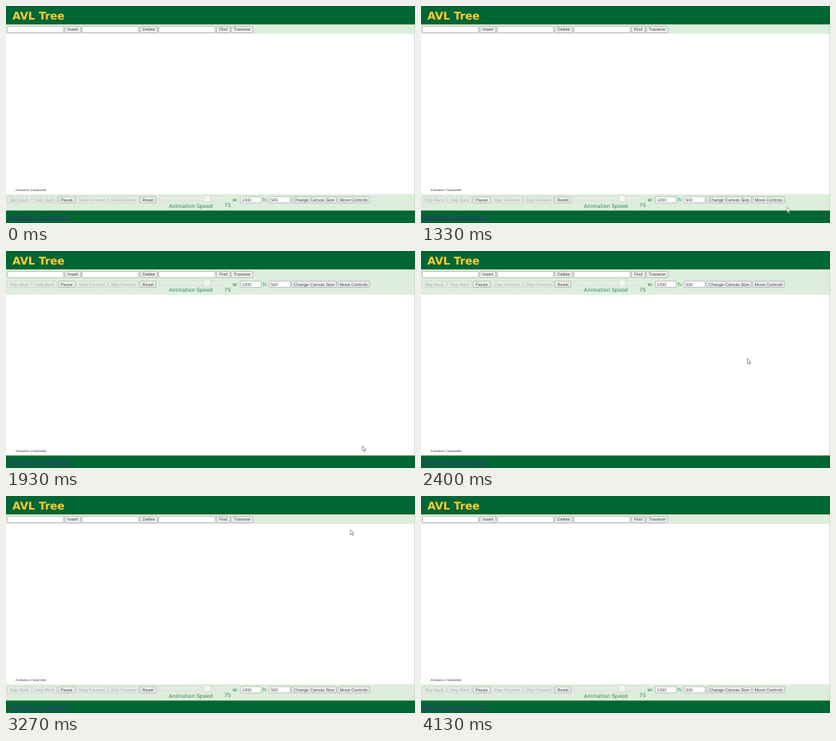
These frames come from a looping animation (512 by 272 pixels, 4.67 s). An HTML page:

```html
<!DOCTYPE html>
<html lang="en">
<head>
<meta charset="utf-8">
<title>AVL Tree</title>
<style>
  html, body { margin: 0; width: 100%; height: 100%; overflow: hidden; background: #fff; }
  svg { display: block; width: 100vw; height: 100vh; }
  text { text-rendering: geometricPrecision; }
  .ui { font: 5.45px "Liberation Sans", Arial, sans-serif; fill: #444; }
  .label { font: 6.43px "DejaVu Sans", Verdana, sans-serif; fill: #33805a; }
  .title { font: bold 13.4px "DejaVu Sans", Verdana, sans-serif; fill: #fc3; }
  .status { font: 4px "Liberation Sans", Arial, sans-serif; fill: #444; }
  .off { fill: #a6aca6; }
  .link { fill: #3a3286; text-decoration: underline; }
</style>
</head>
<body>
<svg id="stage" viewBox="0 0 512 272" preserveAspectRatio="none"></svg>
<script>
const LOOP = 4670, STEP = 200 / 3;
const GREEN = '#063', PALE = '#ded', EDGE = '#cc9';
const TOP_FROM = 29, TOP_TO = 49; // steps with the controls docked at the top
const GAP = 1.8;

const easeOut = u => 1 - (1 - u) ** 2;
const easeInOut = u => u * u * (3 - 2 * u);

// Pointer strokes: each runs from a to b, pulled towards c
const strokes = [
  { from: 0, to: 3, a: [520, 270], c: [500, 268], b: [480, 282], ease: u => u },
  { from: 13, to: 28, a: [488, 273], c: [467, 258], b: [446, 244], ease: easeOut },
  { from: 32, to: 40, a: [446, 244], c: [392, 118], b: [404, 59], ease: easeInOut },
  { from: 40, to: 47, a: [404, 59], c: [478, 28], b: [431, 42], ease: easeInOut },
  { from: 49, to: 62, a: [431, 42], c: [170, 122], b: [50, 282], ease: easeInOut }
];

const stage = document.getElementById('stage');

function add(parent, tag, attrs, content) {
  const node = document.createElementNS('http://www.w3.org/2000/svg', tag);
  for (const key in attrs) node.setAttribute(key, attrs[key]);
  if (content) node.textContent = content;
  parent.append(node);
  return node;
}

const rect = (parent, x, y, width, height, fill, more) =>
  add(parent, 'rect', { x, y, width, height, fill, ...more });

const text = (parent, x, y, cls, content, more) =>
  add(parent, 'text', { x, y, class: cls, ...more }, content);

function box(parent, x, y, width, fill, stroke) {
  rect(parent, x, y, width, 7.8, fill, { rx: .7, stroke, 'stroke-width': .6 });
}

function button(parent, x, y, width, name, off) {
  box(parent, x, y, width, off ? '#e6ece6' : '#efefef', off ? '#c6cdc6' : '#999');
  text(parent, x + width / 2, y + 5.8, off ? 'ui off' : 'ui', name, { 'text-anchor': 'middle' });
}

function field(parent, x, y, width, value) {
  box(parent, x, y, width, '#fff', '#999');
  text(parent, x + 1.8, y + 5.8, 'ui', value);
}

// Lays [draw, width, name, off] items side by side
function row(parent, x, y, items) {
  for (const [draw, width, name, off] of items) {
    draw(parent, x, y, width, name, off);
    x += width + GAP;
  }
}

// Page
rect(stage, 0, 0, 512, 272, '#fff');
rect(stage, 0, 0, 512, 23.2, GREEN);
rect(stage, 0, 23.2, 512, 11.8, PALE);
rect(stage, 0, 23.2, 512, .5, EDGE);
text(stage, 8, 17, 'title', 'AVL Tree');
row(stage, 1.6, 25.6, [
  [field, 70.4], [button, 19.8, 'Insert'],
  [field, 70.6], [button, 21.6, 'Delete'],
  [field, 70.6], [button, 16.8, 'Find'], [button, 26.6, 'Traverse']
]);
const status = text(stage, 12, 231.9, 'status', 'Animation Completed');

// Animation controls
const controls = add(stage, 'g', {});
rect(controls, 0, 236, 512, 20, PALE);
row(controls, 1.6, 239, [
  [button, 29.8, 'Skip Back', true], [button, 30.4, 'Step Back', true],
  [button, 21, 'Pause'], [button, 38.4, 'Step Forward', true],
  [button, 37.4, 'Skip Forward', true], [button, 20, 'Reset']
]);
rect(controls, 191.5, 238.6, 79.5, 5.4, '#e6ebe6', { stroke: '#d0d8d0', 'stroke-width': .5 });
rect(controls, 247.6, 237, 8.6, 8.6, '#f4f4f4', { rx: .8, stroke: '#ccc', 'stroke-width': .6 });
text(controls, 204, 252.7, 'label', 'Animation Speed');
text(controls, 273.3, 252.4, 'label', '75');
text(controls, 283.6, 245.2, 'label', 'w:');
field(controls, 293.4, 239, 26.2, '1000');
text(controls, 321.2, 245.2, 'label', 'h:');
row(controls, 329.4, 239, [
  [field, 26.4, '500'], [button, 55.8, 'Change Canvas Size'], [button, 39.8, 'Move Controls']
]);

// Footer
rect(stage, 0, 256, 512, 16, EDGE);
rect(stage, 0, 256.5, 512, 15.5, GREEN);
text(stage, 3.5, 267, 'label link', 'Algorithm Visualizations');
rect(stage, 511.3, 24, .7, 232, '#ccc');

const pointer = add(stage, 'path', {
  d: 'M0 0V6.6L1.5 5.2L2.6 7.7L3.7 7.2L2.6 4.8H4.7Z',
  fill: '#fff', stroke: '#666', 'stroke-width': .6, 'stroke-linejoin': 'round'
});

// Rests at the end of the latest stroke until the next one begins
function pointerAt(step) {
  const { from, to, a, b, c, ease } = strokes.findLast(s => s.from <= step);
  const u = ease(Math.min(1, (step - from) / (to - from))), v = 1 - u;
  return a.map((p, i) => v * v * p + 2 * u * v * c[i] + u * u * b[i]);
}

function draw(time) {
  const step = Math.floor((time % LOOP + 4) / STEP);
  const docked = step >= TOP_FROM && step < TOP_TO;
  controls.setAttribute('transform', `translate(0 ${docked ? -201.2 : 0})`);
  status.setAttribute('y', docked ? 252.4 : 231.9);
  pointer.setAttribute('transform', `translate(${pointerAt(step)})`);
}

const start = performance.now();
function tick() {
  draw(performance.now() - start);
  requestAnimationFrame(tick);
}
tick();
</script>
</body>
</html>
```
